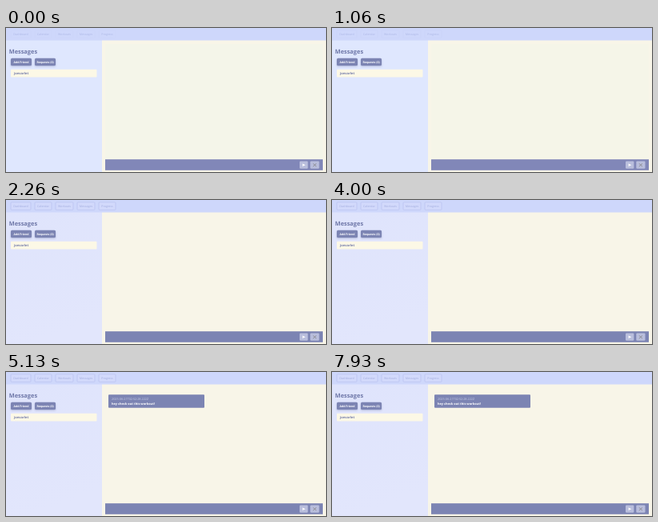
Write an HTML page that moves like this. It is 400 px wide and 180 px high and loops after 8000 ms.

```html
<!DOCTYPE html>
<html lang="en">
<head>
<meta charset="utf-8">
<title>Messages</title>
<style>
html, body { margin: 0; width: 100%; height: 100%; overflow: hidden; }
svg { display: block; width: 400px; height: 180px; }
text { font-family: "Open Sans", "Noto Sans", sans-serif; text-rendering: geometricPrecision; }
.bold { font-weight: 700; }
.slate { fill: #7c84b3; }
.white { fill: #fff; }
.tile { fill: #b9bedc; }
#nav rect { fill: #d2d9fb; stroke: #b5beec; stroke-width: .6; }
#nav text { fill: #a2acdd; font-size: 3.6px; text-anchor: middle; }
</style>
</head>
<body>
<svg viewBox="0 0 400 180">
  <defs>
    <linearGradient id="sideFill" x1="0" y1="0" x2=".3" y2="1">
      <stop offset="0" stop-color="#dfe4fc"/>
      <stop offset="1" stop-color="#e2e6fc"/>
    </linearGradient>
    <filter id="soft" x="-20%" y="-20%" width="140%" height="160%">
      <feGaussianBlur stdDeviation=".9"/>
    </filter>
  </defs>

  <rect id="page" width="400" height="180" fill="#f8f5e8"/>
  <rect id="panel" x="124" y="20" width="272" height="144" fill="#f4f5e9"/>
  <rect id="side" y="15" width="120" height="165" fill="url(#sideFill)"/>
  <rect id="top" width="400" height="15.5" fill="#ced7fb"/>
  <g id="nav"></g>

  <text class="bold" x="3.7" y="32" font-size="7.4" fill="#7079a9">Messages</text>
  <g id="buttons"></g>
  <rect x="6" y="51.7" width="107.5" height="9.8" rx="1" fill="#fcf8e6"/>
  <text class="bold" x="10" y="58.1" font-size="4" fill="#727ba8">jonvarlet</text>

  <g id="message">
    <rect class="slate" x="128" y="28.2" width="120" height="16.6" rx="1"/>
    <text x="132" y="35.1" font-size="3.75" fill="#ced3ec">2025-06-21T02:52:28.222Z</text>
    <text class="bold white" x="132" y="41.4" font-size="3.9">hey check out this workout!</text>
  </g>

  <rect id="bar" class="slate" x="124" y="164.2" width="272" height="13.6"/>
  <rect class="tile" x="367" y="166.4" width="10.4" height="9.4" rx="1.2"/>
  <path class="white" d="M370.4 169.4l4 1.8-4 1.8.4-1.5z"/>
  <rect class="tile" x="380.3" y="166.4" width="11.2" height="9.4" rx="1.2"/>
  <path d="M383.8 169.4l4.2 3.8m0-3.8l-4.2 3.8" stroke="#8f8f98" stroke-width="1" fill="none"/>
</svg>
<script>
const LOOP = 8000;
const $ = id => document.getElementById(id);

$("nav").innerHTML = [
  ["Dashboard", 6, 25], ["Calendar", 36, 21], ["Workouts", 62, 22],
  ["Messages", 89, 22], ["Progress", 116, 21]
].map(([label, x, w]) =>
  `<rect x="${x}" y="2.8" width="${w}" height="9.6" rx="1"/>
   <text x="${x + w / 2}" y="8.9">${label}</text>`).join("");

$("buttons").innerHTML = [["Add Friend", 6], ["Requests (0)", 36]].map(([label, x]) =>
  `<rect x="${x}" y="39" width="26" height="9" rx="1.5" fill="#7079a9" opacity=".45" filter="url(#soft)"/>
   <rect class="slate" x="${x}" y="37.8" width="26" height="9.2" rx="1.5"/>
   <text class="bold white" x="${x + 13}" y="43.8" font-size="3.5" text-anchor="middle">${label}</text>`).join("");

// Each value holds until the next time in the table.
function hold(target, prop, steps) {
  const frames = steps.map(([t, v]) => ({ offset: t / LOOP, [prop]: v, easing: "steps(1, end)" }));
  frames.push({ offset: 1, [prop]: steps[steps.length - 1][1] });
  target.animate(frames, { duration: LOOP, iterations: Infinity });
}

const boxes = document.querySelectorAll("#nav rect");
const labels = document.querySelectorAll("#nav text");
boxes.forEach(b => hold(b, "opacity", [[0, .08], [1000, .2], [1660, .7], [1930, .85], [2260, 1]]));
labels.forEach(l => hold(l, "opacity", [[0, .75], [1660, .9], [2260, 1]]));
hold($("panel"), "opacity", [[0, 1], [1000, .7], [1660, .35], [1930, .15], [2260, 0]]);
hold($("side"), "fill", [[0, "#dfe7fe"], [1660, "#e2e7fd"], [2260, "url(#sideFill)"]]);
hold($("bar"), "fill", [[0, "#8187b8"], [1660, "#7e86b5"], [2260, "#7c84b3"]]);
hold($("message"), "opacity", [[0, 0], [5130, 1]]);
</script>
</body>
</html>
```
